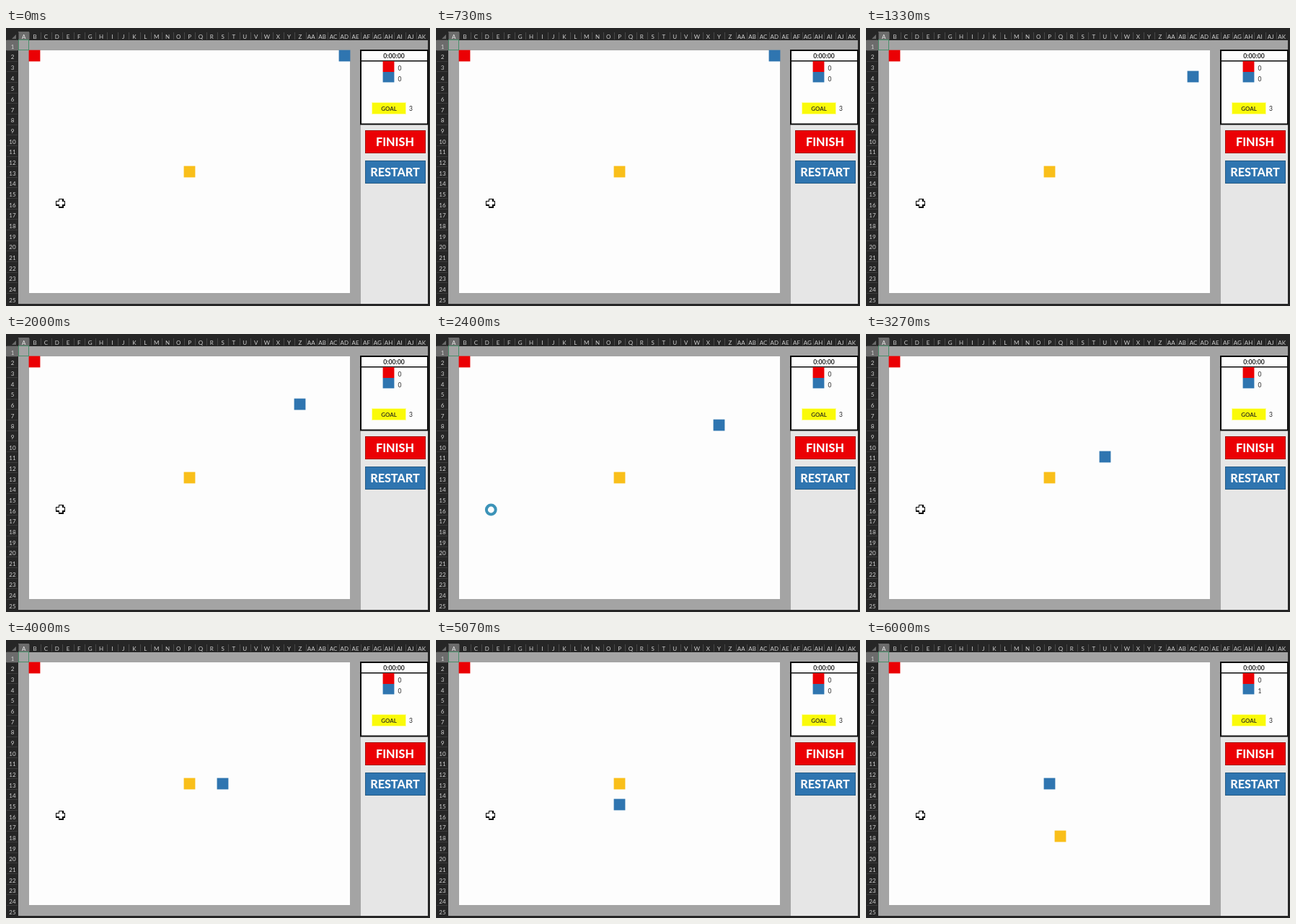
An HTML page with a canvas for the animation above (6600 ms loop, 588 px wide and 386 px high).

```html
<!DOCTYPE html>
<html lang="en">
<head>
<meta charset="utf-8">
<title>Spreadsheet chase game</title>
<style>
  html, body { margin: 0; width: 100%; height: 100%; overflow: hidden; background: #262626; }
  canvas { display: block; }
</style>
</head>
<body>
<canvas width="588" height="386"></canvas>
<script>
const ctx = document.querySelector('canvas').getContext('2d');
const LOOP = 6600;
const COL_W = 15.33, ROW_H = 14.65;
const RED = '#eb0004', BLUE = '#2f75b0', GOLD = '#f9bf1a';
const DARK = '#262626', GRAY = '#a4a4a4', PANEL = '#e6e6e6', PAPER = '#fdfdfd';
const INK = '#262626';

// Blue player's key presses, spread evenly over each [start, end] stretch.
const START = { col: 29, row: 2 };
const MOVES = [
  [870, 1330, 'DLD'],
  [1330, 2400, 'LDLDLDLD'],
  [2400, 3270, 'LDLDLDL'],
  [3270, 4000, 'LDLD'],
  [4000, 5070, 'LDLDL'],
  [5070, 5470, 'UU'],
];
const CAPTURE = 5470;
const BUSY = [2270, 2540];

const colX = col => Math.round(17 + col * COL_W);
const rowY = row => Math.round(31 + (row - 2) * ROW_H);

function colName(i) {
  const letter = n => String.fromCharCode(65 + n);
  return i < 26 ? letter(i) : 'A' + letter(i - 26);
}

function rect(x, y, w, h, color) {
  ctx.fillStyle = color;
  ctx.fillRect(x, y, w, h);
}

function frame(x, y, w, h, color, width = 1) {
  ctx.strokeStyle = color;
  ctx.lineWidth = width;
  ctx.strokeRect(x, y, w, h);
}

function text(str, x, y, size, color, weight = 400) {
  ctx.font = `${weight} ${size}px Lato, sans-serif`;
  ctx.textAlign = 'center';
  ctx.textBaseline = 'alphabetic';
  ctx.fillStyle = color;
  ctx.fillText(str, x, y + size * 0.36);
}

// Slightly oversized so the edges come out soft.
function cell(col, row, color) {
  rect(colX(col) - 0.4, rowY(row) - 0.4, 15.8, 15.8, color);
}

function headers() {
  rect(17, 5, 15, 12, '#6c6c6c');
  rect(0, 17, 17, 14, '#6c6c6c');
  for (let i = 0; i < 37; i++) {
    rect(colX(i), 6, 1, 10, '#484848');
    text(colName(i), 24.7 + i * COL_W, 12, 8, i ? '#cfcfcf' : '#ededed');
  }
  for (let r = 1; r <= 25; r++) {
    rect(1, rowY(r), 15, 1, '#3c3c3c');
    text(r, 9, 25.8 + (r - 1) * 14.67, 8, '#d4d4d4');
  }
  ctx.fillStyle = '#6a6a6a';
  ctx.beginPath();
  ctx.moveTo(14, 9);
  ctx.lineTo(14, 15);
  ctx.lineTo(8, 15);
  ctx.fill();
}

function button(label, y, color, edge) {
  rect(498, y, 84, 32, color);
  frame(498.5, y + 0.5, 83, 31, edge);
  text(label, 539.5, y + 16.3, 16.2, '#fafafa', 800);
}

function scoreboard(blueScore) {
  rect(491, 30, 94, 104, PAPER);
  frame(492, 31, 93, 102.5, '#0c0c0c', 2);
  rect(492, 45, 93, 1.5, '#0c0c0c');
  text('0:00:00', 538, 39, 8.7, INK, 700);
  rect(522.6, 46, 15.8, 15, RED);
  rect(522.6, 61, 15.8, 14.4, BLUE);
  text('0', 546, 56, 8.5, INK);
  text(blueScore, 546, 71, 8.5, INK);
  rect(507, 103, 48, 17, '#ffffa0');
  rect(508, 104, 46, 15, '#fafa0a');
  text('GOAL', 531, 112.3, 7.9, '#3a3a1a', 700);
  text('3', 561.5, 112.3, 8.5, INK);
}

function pointer(busy) {
  if (busy) {
    ctx.strokeStyle = '#3c93b8';
    ctx.lineWidth = 4;
    ctx.beginPath();
    ctx.arc(76.3, 244, 6.4, 0, Math.PI * 2);
    ctx.stroke();
    return;
  }
  rect(73, 237, 7, 13, '#000');
  rect(69, 240, 13, 7, '#000');
  rect(74, 238, 4, 10, '#fff');
  rect(70, 241, 11, 4, '#fff');
}

function bluePosition(t) {
  let { col, row } = START;
  for (const [start, end, keys] of MOVES) {
    [...keys].forEach((key, i) => {
      if (t < start + (end - start) * (i + 1) / keys.length) return;
      if (key === 'L') col--;
      else row += key === 'D' ? 1 : -1;
    });
  }
  return [col, row];
}

function draw(t) {
  const captured = t >= CAPTURE;

  rect(0, 0, 588, 386, DARK);
  rect(17, 17, 568, 366, GRAY);
  rect(492, 31, 93, 352, PANEL);
  rect(32, 31, 445, 337, PAPER);
  headers();

  scoreboard(captured ? 1 : 0);
  button('FINISH', 142, RED, '#a80808');
  button('RESTART', 184, BLUE, '#255b85');

  cell(1, 2, RED);
  if (captured) cell(16, 18, GOLD);
  else cell(15, 13, GOLD);
  cell(...bluePosition(t), BLUE);
  frame(17.5, 16.5, 14, 14, '#4a8f6b');
  pointer(t >= BUSY[0] && t < BUSY[1]);
}

const origin = performance.now();
function tick() {
  draw((performance.now() - origin) % LOOP);
  requestAnimationFrame(tick);
}
tick();
</script>
</body>
</html>
```
